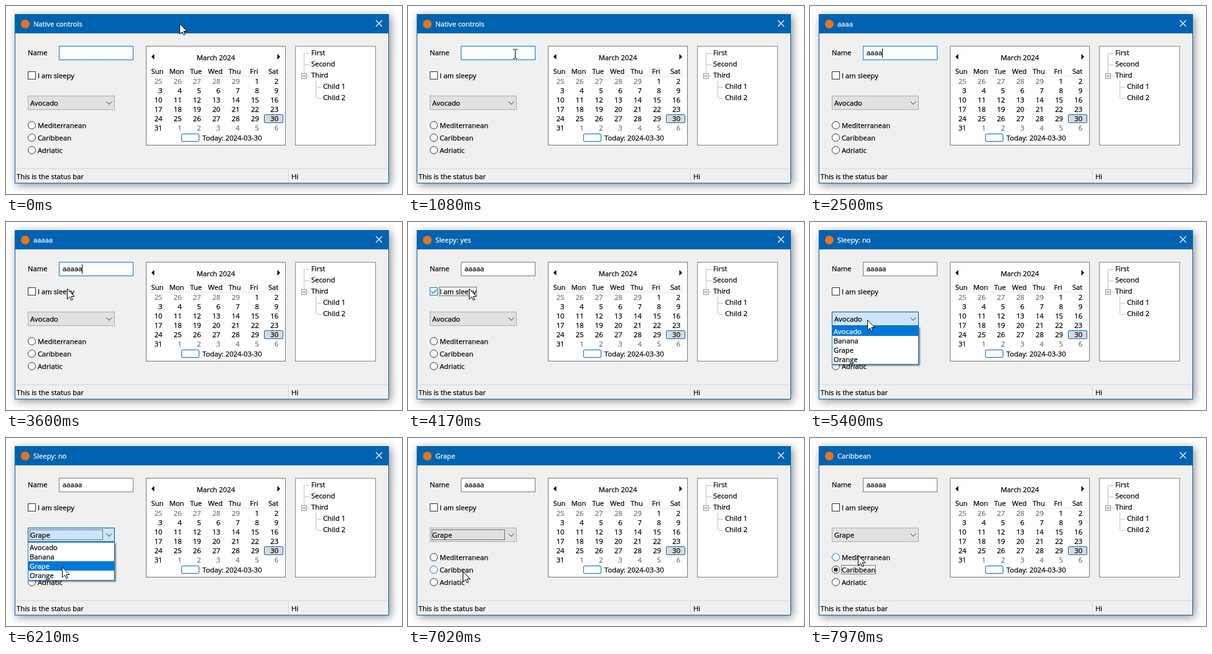
These frames come from a looping animation (637 px wide and 302 px high, 8 s). An HTML page:

```html
<!DOCTYPE html>
<html lang="en">
<head>
<meta charset="utf-8">
<title>Native controls</title>
<style>
  html, body { margin: 0; width: 100%; height: 100%; overflow: hidden; background: #fff; }
  svg { display: block; width: 637px; height: 302px; }
  text { font: 11.25px "Open Sans", "Noto Sans", sans-serif; white-space: pre; stroke-width: .25px; }
  rect, line { shape-rendering: crispEdges; }
  .window { filter: drop-shadow(3px 3px 7px rgba(0, 0, 0, .45)); }
  .list { filter: drop-shadow(2px 2px 1px rgba(0, 0, 0, .45)); }
</style>
</head>
<body>
<svg viewBox="0 0 637 302"><g id="base"></g><g id="live"></g></svg>
<script>
const LOOP = 8000;
const BLUE = '#0078d7', INK = '#333', EDGE = '#7a7a7a', TREE = '#828790', MARK = '#0066cc';

// Markup helpers; boxes take their outer pixel bounds.
const label = (x, y, s, fill = '#000', anchor = 'start') =>
  `<text x="${x}" y="${y}" fill="${fill}" stroke="${fill}" text-anchor="${anchor}">${s}</text>`;
const fillRect = (x, y, w, h, fill) =>
  `<rect x="${x}" y="${y}" width="${w}" height="${h}" fill="${fill}"/>`;
const box = (x, y, w, h, fill, stroke, extra = '') =>
  `<rect x="${x + .5}" y="${y + .5}" width="${w - 1}" height="${h - 1}" fill="${fill}" stroke="${stroke}" ${extra}/>`;
const path = (d, stroke, fill = 'none', extra = '') =>
  `<path d="${d}" stroke="${stroke}" fill="${fill}" ${extra}/>`;
const focusRect = (x, y, w, h) =>
  box(x, y, w, h, 'none', '#000', 'stroke-dasharray="1 1" stroke-dashoffset=".5"');
const markRect = (x, y, w, h, fill) =>
  box(x, y, w, h, fill, MARK, 'rx="1.5" style="shape-rendering:auto"');

function calendar() {
  const column = i => 243.5 + 31.1 * i;
  let out = box(225, 64, 225, 160, '#fff', EDGE) +
    label(337.5, 87, 'March 2024', '#000', 'middle') +
    path('M234 81.500l4.500-4.500v9z', 'none', '#000') + path('M441 81.500l-4.500-4.500v9z', 'none', '#000') +
    fillRect(233, 112, 211, 1, '#e2e2e2') +
    markRect(415, 174, 31, 14, '#d9d9d9');
  ['Sun', 'Mon', 'Tue', 'Wed', 'Thu', 'Fri', 'Sat'].forEach((day, i) =>
    out += label(column(i), 109, day, '#000', 'middle'));
  for (let i = 0; i < 42; i++) {
    const date = new Date(2024, 1, 25 + i);
    out += label(column(i % 7) + 8, 125 + 15 * Math.floor(i / 7), date.getDate(),
      date.getMonth() === 2 ? '#000' : '#757575', 'end');
  }
  return out + markRect(282, 205, 29, 13, '#fff') + label(316, 216, 'Today: 2024-03-30');
}

function tree() {
  const dots = path('M479.5 76V107M481 76.5H489M481 94.5H489M485 112.5H489M498.5 120V148M500 130.5H508M500 148.5H508',
    '#808080', 'none', 'stroke-dasharray="1 1" shape-rendering="crispEdges"');
  return box(465, 64, 130, 160, '#fff', TREE) + dots +
    box(475, 108, 9, 9, '#fafafa', '#919191', 'rx="1"') + fillRect(477, 112, 5, 1, '#4b63a7') +
    ['First', 'Second', 'Third'].map((s, i) => label(491, 79 + 18 * i, s)).join('') +
    ['Child 1', 'Child 2'].map((s, i) => label(510, 133 + 18 * i, s)).join('');
}

const windowFrame = () =>
  `<g class="window">${box(14, 13, 602, 272, '#f0f0f0', '#0063b1')}</g>` +
  fillRect(14, 13, 602, 31, '#0063b1') +
  '<circle cx="31" cy="29" r="7" fill="#e8731c"/>' +
  path('M595 23l10 10M605 23l-10 10', '#fff', 'none', 'stroke-width="1.2"') +
  fillRect(15, 261, 600, 1, '#d7d7d7') + fillRect(454, 263, 1, 21, '#d7d7d7') +
  label(17, 278, 'This is the status bar') + label(459, 278, 'Hi') + label(35, 79, 'Name');

const toggleStyle = mood => ({
  hover: ['#fff', BLUE], press: ['#cce4f7', '#005499'],
}[mood] || ['#fff', INK]);

function nameField({ name, focus, caret }) {
  const caretX = Math.round(91 + 6.2 * name.length);
  return box(85, 64, 120, 23, '#fff', focus === 'name' ? BLUE : EDGE) + label(91, 79, name) +
    (focus === 'name' && caret ? fillRect(caretX, 68, 1, 15, '#000') : '');
}

function checkbox({ check, checked, focus }) {
  const [fill, stroke] = toggleStyle(check);
  return box(35, 105, 13, 13, fill, stroke) + label(51, 116, 'I am sleepy') +
    (checked ? path('M37.500 111.500l3 3l5.500-6', stroke, 'none', 'stroke-width="1.4"') : '') +
    (focus === 'check' ? focusRect(50, 104, 61, 15) : '');
}

function radios({ radio, radioMood, picked, focus }) {
  return ['Mediterranean', 'Caribbean', 'Adriatic'].map((s, i) => {
    const y = 191.5 + 20 * i;
    const [fill, stroke] = toggleStyle(i === radio ? radioMood : '');
    return `<circle cx="41.5" cy="${y}" r="6" fill="${fill}" stroke="${stroke}"/>` +
      (picked === i ? `<circle cx="41.5" cy="${y}" r="3.3" fill="${stroke}"/>` : '') +
      label(51, y + 4.5, s);
  }).join('') + (focus === 'radio' ? focusRect(50, 204, 56, 15) : '');
}

function combo({ fruit, comboMood, open, row, focus }) {
  const [fill, stroke] = {
    fade: ['#e2e9ef', '#4f90c6'], hover: ['#e5f1fb', BLUE], press: ['#cce4f7', '#005499'],
  }[comboMood] || ['#e1e1e1', '#adadad'];
  let out = box(35, 144, 140, 23, fill, stroke) + label(39, 160, fruit) +
    path('M161.500 153.500l4.500 4.500l4.500-4.500', '#333') +
    (focus === 'combo' ? focusRect(38, 147, 118, 17) : '');
  if (!open) return out;
  out += `<g class="list">${box(35, 167, 140, 62, '#fff', BLUE)}</g>`;
  ['Avocado', 'Banana', 'Grape', 'Orange'].forEach((s, i) => {
    const y = 168 + 15 * i;
    if (i === row) out += fillRect(36, y, 138, 15, BLUE);
    out += label(38, y + 12, s, i === row ? '#fff' : '#000');
  });
  return out;
}

function pointer({ cursor, x, y }) {
  const shapes = {
    arrow: path('M.5.5V17L4.500 13.400L7 18.700L9.300 17.700L6.900 12.500H12Z', '#000', '#fff'),
    beam: path('M-3-7.500H-1L.5-6.500L2-7.500H4M.5-7V7M-3 7.500H-1L.5 6.500L2 7.500H4', '#000'),
  };
  return `<g transform="translate(${x} ${y})">${shapes[cursor] || ''}</g>`;
}

// Each step changes part of the state and holds until the next one.
const at = (time, changes) => ({ time, changes });
const move = (time, x, y, changes = {}) => at(time, { x, y, ...changes });
const type = (time, name) => at(time, { name, title: name, caret: true, cursor: '' });
const steps = [
  move(0, 279, 28, { cursor: 'arrow', title: 'Native controls', name: '', focus: 'name', fruit: 'Avocado', row: 0 }),
  move(260, 272, 32), move(400, 252, 42), move(540, 229, 55, { caret: true }), move(670, 210, 64),
  move(800, 188, 74, { cursor: 'beam' }), move(940, 177, 76), move(1080, 172, 77, { caret: false }),
  type(1350, 'a'), type(1640, 'aa'), type(2070, 'aaa'), type(2500, 'aaaa'), type(2780, 'aaaaa'),
  move(3060, 132, 77, { cursor: 'beam' }), move(3200, 115, 88, { cursor: 'arrow' }),
  move(3340, 106, 93), move(3470, 101, 98), move(3600, 98, 107),
  at(3740, { check: 'hover' }),
  at(3890, { check: 'press', focus: 'check' }),
  at(4030, { check: 'hover', checked: true, title: 'Sleepy: yes' }),
  at(4440, { check: 'press' }),
  at(4580, { check: 'hover', checked: false, title: 'Sleepy: no' }),
  move(4720, 96, 120, { check: '' }), move(4850, 93, 140), move(4980, 92, 157, { comboMood: 'fade' }),
  at(5120, { comboMood: 'hover' }),
  at(5260, { comboMood: 'press', focus: '' }),
  at(5400, { open: true }),
  move(5530, 91, 174), move(5670, 91, 191, { row: 1 }), move(5810, 90, 207, { row: 2 }),
  at(6210, { fruit: 'Grape', focus: 'combo' }),
  at(6340, { open: false, title: 'Grape', comboMood: 'hover', radio: 1, radioMood: 'hover' }),
  move(6470, 90, 209, { comboMood: 'fade' }), at(6600, { comboMood: '' }),
  move(6890, 89, 212), move(7020, 88, 214),
  at(7430, { radioMood: 'press', focus: 'radio' }),
  at(7570, { radioMood: 'hover', picked: 1, title: 'Caribbean' }),
  move(7710, 85, 206), move(7840, 80, 196, { radio: 0 }), move(7970, 77, 188),
];

const base = document.getElementById('base');
const live = document.getElementById('live');
base.innerHTML = windowFrame() + calendar() + tree();

let shown = 0;
function render(now) {
  const past = steps.filter(step => step.time <= now % LOOP);
  if (past.length !== shown) {
    shown = past.length;
    const state = Object.assign({}, ...past.map(step => step.changes));
    live.innerHTML = label(44, 33, state.title, '#fff') +
      [nameField, checkbox, radios, combo, pointer].map(draw => draw(state)).join('');
  }
}

const start = performance.now();
function tick() {
  render(performance.now() - start);
  requestAnimationFrame(tick);
}
tick();
</script>
</body>
</html>
```
